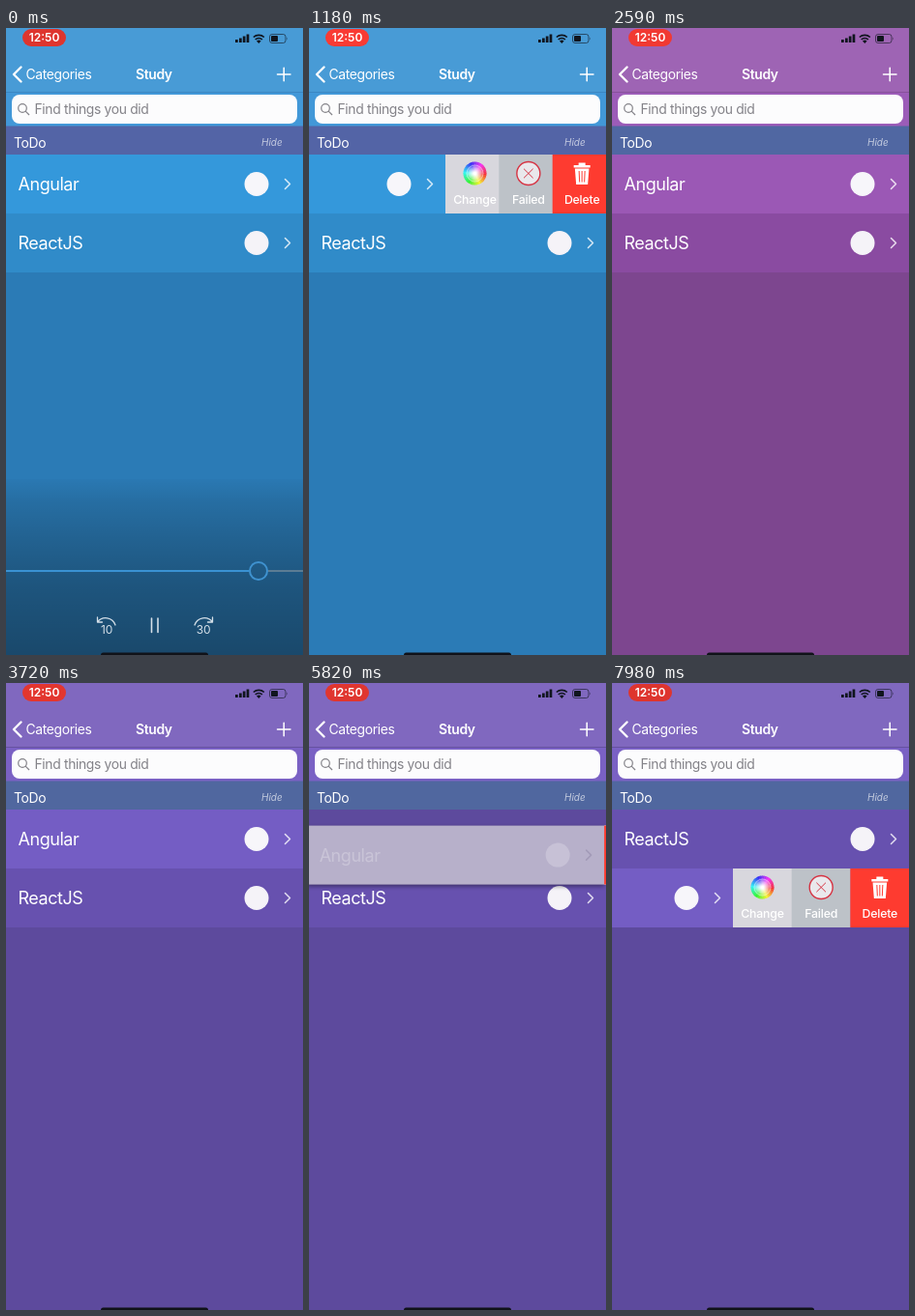
Animation of 307 by 649 pixels, one loop 8000 ms. Source, as an HTML page:

```html
<!DOCTYPE html>
<html lang="en">
<head>
<meta charset="utf-8">
<title>Study list</title>
<style>
  html, body { margin: 0; width: 100%; height: 100%; overflow: hidden; }
  svg { display: block; width: 307px; height: 649px; background: var(--bg); }
  text { font: 400 13.9px Inter, Roboto, sans-serif; letter-spacing: -.35px; fill: #fff; }
  .bold { font-weight: 600; }
  .clock { font-size: 12px; font-weight: 600; letter-spacing: 0; text-anchor: middle; }
  .hide { font-size: 10px; font-style: italic; letter-spacing: 0; fill: #ffffffa8; }
  .find { fill: #838288; }
  .item { font-size: 18px; letter-spacing: -.45px; }
  .label { font-size: 12.3px; font-weight: 500; letter-spacing: -.2px; text-anchor: middle; }
  .skip { font-size: 12px; text-anchor: middle; fill: #d4dfe8; }
  .line { fill: none; stroke: #fff; stroke-linecap: round; stroke-linejoin: round; }
  .chevron { stroke-width: 1.5; opacity: .8; }
</style>
</head>
<body>
<svg viewBox="0 0 307 649">
  <defs>
    <linearGradient id="shade" x2="0" y2="1">
      <stop offset="0" stop-opacity=".02"/>
      <stop offset=".13" stop-opacity=".11"/>
      <stop offset=".35" stop-opacity=".21"/>
      <stop offset=".6" stop-opacity=".31"/>
      <stop offset="1" stop-opacity=".41"/>
    </linearGradient>
    <radialGradient id="glow">
      <stop offset=".1" stop-color="#fff"/>
      <stop offset=".8" stop-color="#fff" stop-opacity="0"/>
    </radialGradient>
    <filter id="shadow" x="-10%" y="-20%" width="120%" height="150%">
      <feGaussianBlur stdDeviation="2"/>
    </filter>
  </defs>

  <g id="react">
    <rect width="307" height="61" fill="var(--row2)"/>
    <text class="item" x="12.5" y="37">ReactJS</text>
    <circle cx="259" cy="30.5" r="12.5" fill="#f5f3f8"/>
    <path class="line chevron" d="M288.500 25.500l5 5-5 5"/>
  </g>

  <g id="angular">
    <rect id="drop" y="2" width="307" height="61" filter="url(#shadow)"/>
    <rect id="card" width="307" height="61"/>
    <g id="content">
      <text class="item" x="12.5" y="37">Angular</text>
      <circle cx="259" cy="30.5" r="12.5" fill="#f7f6fa"/>
      <path id="arrow" class="line chevron" d="M288.500 25.500l5 5-5 5"/>
    </g>
    <g id="change">
      <rect width="61" height="61" fill="#d8d7dd"/>
      <g id="wheel"></g>
      <text class="label" x="30.5" y="50.5">Change</text>
    </g>
    <g id="failed">
      <rect width="61" height="61" fill="#bdc2c8"/>
      <circle cx="30.5" cy="19.5" r="12" fill="#e9e8ec" stroke="#d63343" stroke-width="1.4"/>
      <path class="line" style="stroke:#d63343" d="M26 15l9 9m0-9l-9 9"/>
      <text class="label" x="30.5" y="50.5">Failed</text>
    </g>
    <g id="delete">
      <rect width="61" height="61" fill="#fe3b30"/>
      <path d="M22 11h17v2.500H22zM27 8.500h7V11h-7zM23.200 14.500h14.600L36.500 31h-12z" fill="#fff"/>
      <path d="M27.500 17l.5 11.500M30.500 17v11.500M33.500 17l-.5 11.500" stroke="#fe3b30"/>
      <text class="label" x="30.5" y="50.5">Delete</text>
    </g>
  </g>

  <rect width="307" height="67" fill="var(--nav)"/>
  <rect y="67" width="307" height="35" fill="var(--search)"/>
  <path d="M0 66.500h307" stroke="var(--line)"/>
  <rect y="101.500" width="307" height="29.500" fill="var(--head)"/>

  <rect id="pill" x="17" y="1" width="45" height="18" rx="9"/>
  <text class="clock" x="39.5" y="14.4">12:50</text>
  <g fill="#10151e">
    <path d="M237 12h2.700v3H237zM241 10.500h2.700V15H241zM244.800 8.500h2.700V15h-2.700zM248.600 6.500h2.700V15h-2.700z"/>
    <path d="M259 13.500a3.500 3.500 0 0 1 4.600 0L261.300 16z"/>
    <path d="M255.800 9.500a8 8 0 0 1 11 0M257.700 12a5.200 5.200 0 0 1 7.200 0" fill="none" stroke="#10151e" stroke-width="1.700"/>
    <rect x="272.500" y="6.500" width="16.500" height="9" rx="2.500" fill="none" stroke="#10151e" stroke-opacity=".6"/>
    <rect x="274" y="8" width="7" height="6" rx="1"/>
    <path d="M290 9.500q1.500 1.500 0 3z" opacity=".6"/>
  </g>

  <path class="line" stroke-width="2.400" d="M15.500 40.500L8 48l7.500 7.500"/>
  <text x="20.5" y="53">Categories</text>
  <text class="bold" x="134" y="53">Study</text>
  <path class="line" stroke-width="1.500" d="M280.500 48h13.500m-6.750-6.750v13.500"/>

  <rect x="6" y="69" width="295" height="30" rx="8" fill="#fcfcfd"/>
  <g fill="none" stroke="#838288" stroke-width="1.200">
    <circle cx="17" cy="83" r="4.300"/>
    <path d="M20.200 86.200l3.800 3.800"/>
  </g>
  <text class="find" x="29.5" y="89">Find things you did</text>
  <text x="8" y="123.5">ToDo</text>
  <text class="hide" x="264" y="122">Hide</text>

  <g id="player">
    <rect y="467" width="307" height="182" fill="url(#shade)"/>
    <path d="M0 562h251" stroke="#3a92d3" stroke-width="2"/>
    <path d="M271 562h36" stroke="#5b7c94" stroke-width="2"/>
    <circle cx="261" cy="562" r="9" fill="none" stroke="#3f92cf" stroke-width="2"/>
    <g class="line" style="stroke:#d4dfe8" stroke-width="1.300">
      <path d="M94.500 610v5h5M94.500 615a10.500 10.500 0 0 1 18.500 3"/>
      <path d="M213.500 610v5h-5M213.500 615a10.500 10.500 0 0 0-18.500 3"/>
      <path d="M150.500 611v14.500m6.500-14.500v14.500" stroke-width="1.600"/>
    </g>
    <text class="skip" x="104" y="627">10</text>
    <text class="skip" x="204" y="627">30</text>
  </g>
  <rect x="98" y="646.500" width="111" height="5" rx="2.500" fill="#101219"/>
</svg>

<script>
const $ = id => document.getElementById(id);
const LOOP = 8000;
const ROW1 = 131, ROW2 = 192;

const names = ['nav', 'line', 'search', 'head', 'row1', 'row2', 'bg'];
const themes = [
  [0x489bd6, 0x3b86c2, 0x4298d8, 0x5364a6, 0x3498db, 0x308bc9, 0x2b7bb6],
  [0x9e64b4, 0x87519b, 0x9c5cb8, 0x5067a2, 0x9b58b5, 0x8a4ba1, 0x7d468f],
  [0x8068bf, 0x66519f, 0x7a61c4, 0x50679f, 0x745dc4, 0x6751af, 0x5d4a9d]
];

const bursts = [
  [150, 1180, 8], [1330, 2330, 8], [2590, 2590, 1], [3030, 3720, 6], [3990, 4530, 5],
  [5110, 5260, 2], [5530, 6520, 8], [6940, 7680, 6], [7980, 7980, 1]
];

function hold(t) {
  let held = 0;
  for (const [start, end, steps] of bursts) {
    if (t < start) break;
    const gap = (end - start) / (steps - 1 || 1);
    held = gap ? start + gap * Math.min(steps - 1, Math.floor((t - start) / gap + .01)) : start;
  }
  return held;
}

// Eased value at t along [time, value] points.
function along(t, ...points) {
  let [t0, v0] = points[0];
  for (const [t1, v1] of points) {
    if (t < t1) {
      const p = Math.max(0, (t - t0) / (t1 - t0));
      return v0 + (v1 - v0) * p * p * (3 - 2 * p);
    }
    [t0, v0] = [t1, v1];
  }
  return v0;
}

function mix(a, b, p) {
  const part = shift => {
    const x = a >> shift & 255, y = b >> shift & 255;
    return Math.round(x + (y - x) * p);
  };
  return p ? a + 0 && (part(16) << 16 | part(8) << 8 | part(0)) : a;
}

const css = c => '#' + c.toString(16).padStart(6, '0');
const move = (id, x, y = 0) => $(id).setAttribute('transform', `translate(${x} ${y})`);

function drawWheel() {
  const point = a => `${30.5 + 12 * Math.cos(a)} ${19.5 + 12 * Math.sin(a)}`;
  const slice = Math.PI / 18;
  let parts = '';
  for (let i = 0; i < 36; i++)
    parts += `<path d="M30.5 19.5L${point(i * slice)}A12 12 0 0 1 ${point((i + 1.2) * slice)}z" fill="hsl(${i * 10} 90% 58%)"/>`;
  $('wheel').innerHTML = parts +
    '<circle cx="30.5" cy="19.5" r="12" fill="url(#glow)"/>' +
    '<circle cx="30.5" cy="19.5" r="8.5" fill="none" stroke="#fff" stroke-opacity=".4"/>';
}

function draw(t) {
  const tint = along(t, [1600, 0], [1900, 1], [3300, 1], [3580, 2]);
  const from = Math.min(1, Math.floor(tint));
  const color = i => mix(themes[from][i], themes[from + 1][i], tint - from);
  names.forEach((name, i) => document.body.style.setProperty('--' + name, css(color(i))));

  const swipe = along(t, [420, 0], [1180, 166], [1330, 183], [1900, 183], [2200, 0],
    [2950, 0], [3250, 183], [3440, 183], [3720, 0], [7090, 0], [7640, 178], [7980, 182]);
  move('content', -swipe);
  move('change', 307 - swipe);
  move('failed', 307 - swipe * 2 / 3);
  move('delete', 307 - swipe / 3);

  const lift = along(t, [5110, 0], [5260, .3], [5700, 1], [6520, 1], [6940, .5], [7090, 0]);
  const x = along(t, [5400, 0], [6400, -5], [6520, -5], [6940, -2], [7090, 0]);
  const y = along(t, [5400, ROW1], [6520, 185], [6940, 195], [7090, ROW2]);
  move('angular', x, y);
  move('react', 0, along(t, [5900, ROW2], [6250, ROW1]));
  $('card').setAttribute('fill', css(mix(color(4), 0xb7b0ca, lift)));
  $('drop').setAttribute('opacity', lift * .4);
  $('content').setAttribute('opacity', 1 - lift * .75);
  $('arrow').style.stroke = css(mix(0xffffff, 0x50466e, lift));

  $('player').setAttribute('opacity', along(t, [100, 1], [450, 0]));
  $('pill').setAttribute('fill', css(mix(0xde352e, 0xfb3c34, .5 - .5 * Math.cos(t / 1000 * Math.PI))));
}

function frame(now) {
  draw(hold(now % LOOP));
  requestAnimationFrame(frame);
}

drawWheel();
draw(0);
requestAnimationFrame(frame);
</script>
</body>
</html>
```
